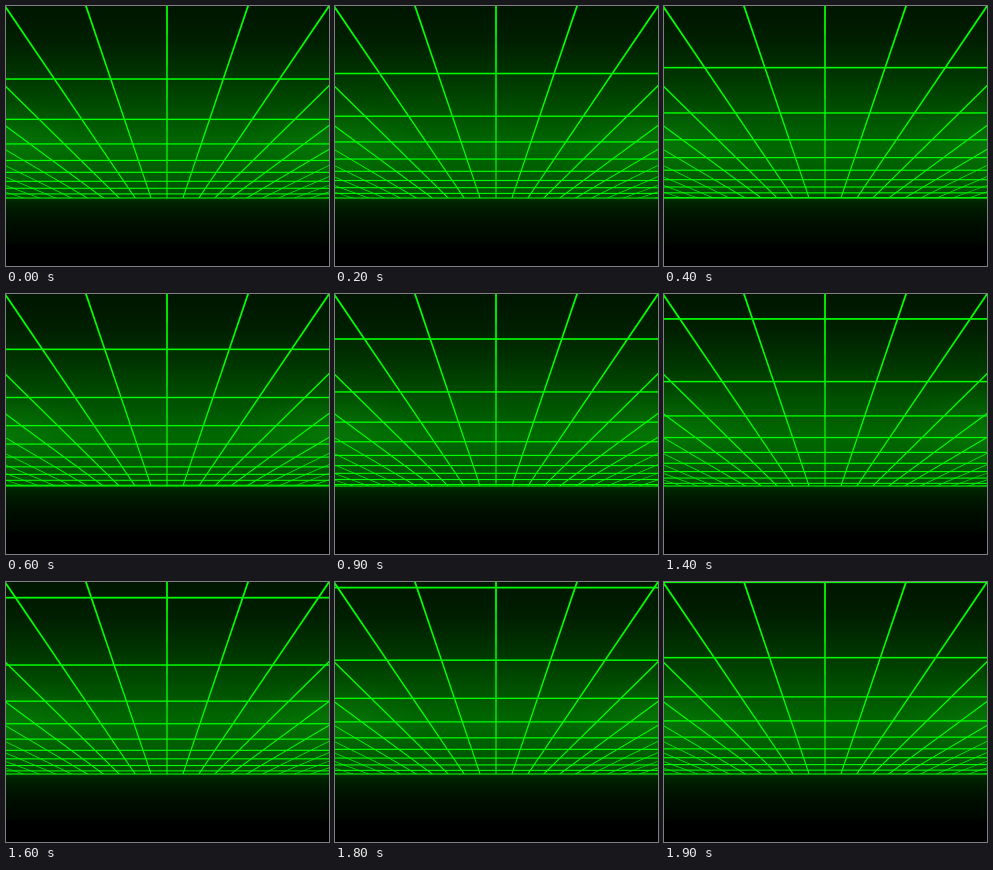
Animation of 323 by 260 pixels, one loop 2000 ms. Source, as an HTML page with a canvas:

```html
<!DOCTYPE html>
<html lang="en">
<head>
<meta charset="utf-8">
<title>Green grid</title>
<style>
html, body { margin: 0; width: 100%; height: 100%; overflow: hidden; background: #000; }
canvas { display: block; width: 323px; height: 260px; }
</style>
</head>
<body>
<canvas id="stage" width="323" height="260"></canvas>
<script>
const W = 323, H = 260;
const ctx = document.getElementById("stage").getContext("2d");

const LOOP = 2000, STEP = 100;
const CX = 161, HORIZON = 239;  // vanishing point
const SCALE = 517;              // screen drop from the horizon at depth 1
const FAR = 11, NEAR = 2.115;   // depth range of the grid
const SLOPE = 0.339;            // sideways spread per grid column
const COLUMNS = 10;
const LINE = "#00ff00";

const depthToY = depth => HORIZON - SCALE / depth;
const lineWidth = y => 1.05 + 0.75 * Math.max(0, 1 - y / 192);

function verticalGradient(stops) {
  const g = ctx.createLinearGradient(0, 0, 0, H);
  for (const [y, green] of stops) g.addColorStop(y / H, `rgb(0,${green},0)`);
  return g;
}

const backdrop = verticalGradient([
  [0, 21], [35, 31], [65, 50], [95, 72], [120, 90], [142, 105],
  [165, 93], [188, 78], [192, 62], [195, 38], [205, 24],
  [220, 13], [237, 5], [239, 0], [260, 0]
]);

function drawSideGlow(x) {
  ctx.save();
  ctx.translate(x, 138);
  ctx.scale(1, 0.45);
  const g = ctx.createRadialGradient(0, 0, 0, 0, 0, 95);
  g.addColorStop(0, "rgba(20,150,20,0.28)");
  g.addColorStop(1, "rgba(20,150,20,0)");
  ctx.fillStyle = g;
  ctx.fillRect(-95, -95, 190, 190);
  ctx.restore();
}

function drawRow(y) {
  const w = lineWidth(y);
  ctx.fillRect(0, y - w / 2, W, w);
}

// Each column line tapers toward the far edge.
function drawColumn(k) {
  const top = -4, bottom = depthToY(FAR);
  const xTop = CX + k * SLOPE * (HORIZON - top);
  const xBottom = CX + k * SLOPE * (HORIZON - bottom);
  const stretch = Math.min(1.6, Math.hypot(1, k * SLOPE));
  const a = lineWidth(top) * stretch / 2;
  const b = lineWidth(bottom) * stretch / 2;
  ctx.beginPath();
  ctx.moveTo(xTop - a, top);
  ctx.lineTo(xTop + a, top);
  ctx.lineTo(xBottom + b, bottom);
  ctx.lineTo(xBottom - b, bottom);
  ctx.fill();
}

function draw(time) {
  const held = Math.floor((time % LOOP) / STEP) * STEP;
  const shift = held / LOOP;

  ctx.fillStyle = backdrop;
  ctx.fillRect(0, 0, W, H);
  drawSideGlow(0);
  drawSideGlow(W);

  ctx.fillStyle = LINE;
  for (let k = -COLUMNS; k <= COLUMNS; k++) drawColumn(k);
  for (let d = NEAR + 1 - shift; d < FAR; d++) drawRow(depthToY(d));
  drawRow(depthToY(FAR));
}

const start = performance.now();
function tick() {
  draw(performance.now() - start);
  requestAnimationFrame(tick);
}
tick();
</script>
</body>
</html>
```
